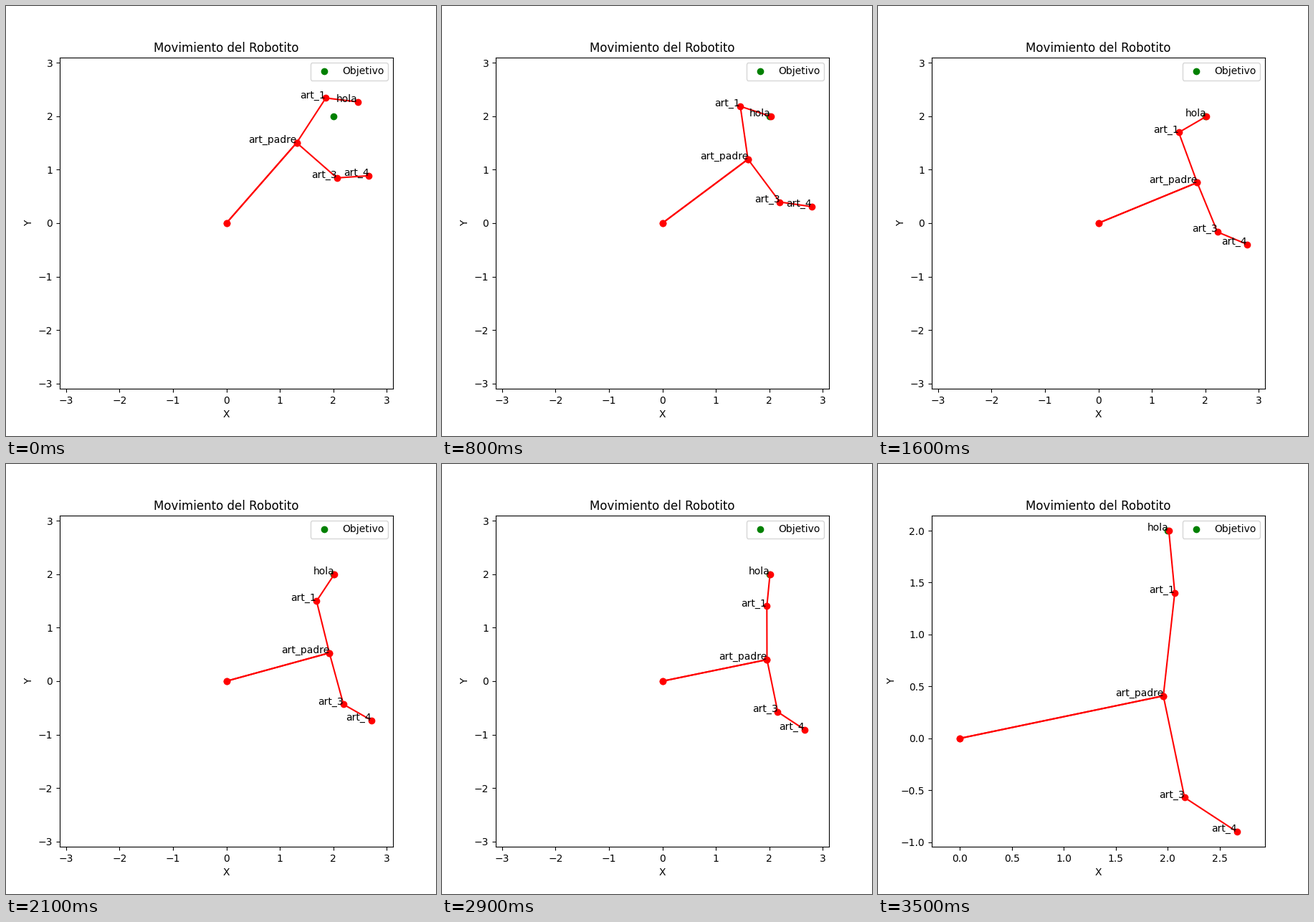
A matplotlib script for the animation above (3600 ms loop, 600x600 px).

```python
import numpy as np
import matplotlib.pyplot as plt
from matplotlib.animation import FuncAnimation

FRAMES = 36
TARGET = 2 + 2j
UPPER, FORE, HAND = 2, 1, 0.6
VIEW = 3.1


def turn(angle):
    return np.exp(1j * angle)


def pose(step):
    """Joint positions, as complex numbers, for one step."""
    settle = 0.45 ** step
    drift = 0.035 * (1 - step / 50)
    tip = TARGET + drift + (0.423 + 0.271j) * settle
    tilt = np.radians(6 + 101 * np.tanh((step - 12) / 16.4) + 50.1 * settle)

    # Two-link inverse kinematics up to the wrist
    wrist = tip - HAND * turn(tilt)
    cos_bend = (abs(wrist) ** 2 - UPPER ** 2 - FORE ** 2) / (2 * UPPER * FORE)
    bend = np.arccos(np.clip(cos_bend, -1, 1))
    heading = np.angle(wrist) - np.angle(UPPER + FORE * turn(bend))

    hub = UPPER * turn(heading)
    elbow = hub + FORE * turn(heading + bend)
    side = hub + FORE * turn(heading - np.pi / 2)
    side_tip = side + HAND * turn(heading - np.pi / 4)
    return {"art_padre": hub, "art_1": elbow, "hola": elbow + HAND * turn(tilt),
            "art_3": side, "art_4": side_tip}


def draw(step):
    joints = pose(step)
    ax.clear()
    ax.plot(TARGET.real, TARGET.imag, "go", label="Objetivo", linestyle="none")
    for arm in (("art_1", "hola"), ("art_3", "art_4")):
        chain = np.array([0, joints["art_padre"]] + [joints[n] for n in arm])
        ax.plot(chain.real, chain.imag, "ro-")
    for name, p in joints.items():
        ax.text(p.real, p.imag, name, ha="right")
    ax.set_aspect("equal", adjustable="datalim")
    # The closing view fits the finished pose
    if step < FRAMES - 1:
        box = ax.get_position()
        half_width = VIEW * box.width / box.height
        ax.set_xlim(-half_width, half_width)
        ax.set_ylim(-VIEW, VIEW)
    ax.set_title("Movimiento del Robotito")
    ax.set_xlabel("X")
    ax.set_ylabel("Y")
    ax.legend(loc="upper right")


fig, ax = plt.subplots(figsize=(6, 6), dpi=100)
anim = FuncAnimation(fig, draw, frames=FRAMES, init_func=lambda: draw(0),
                     interval=100, repeat=True, repeat_delay=0)
plt.show()
```
